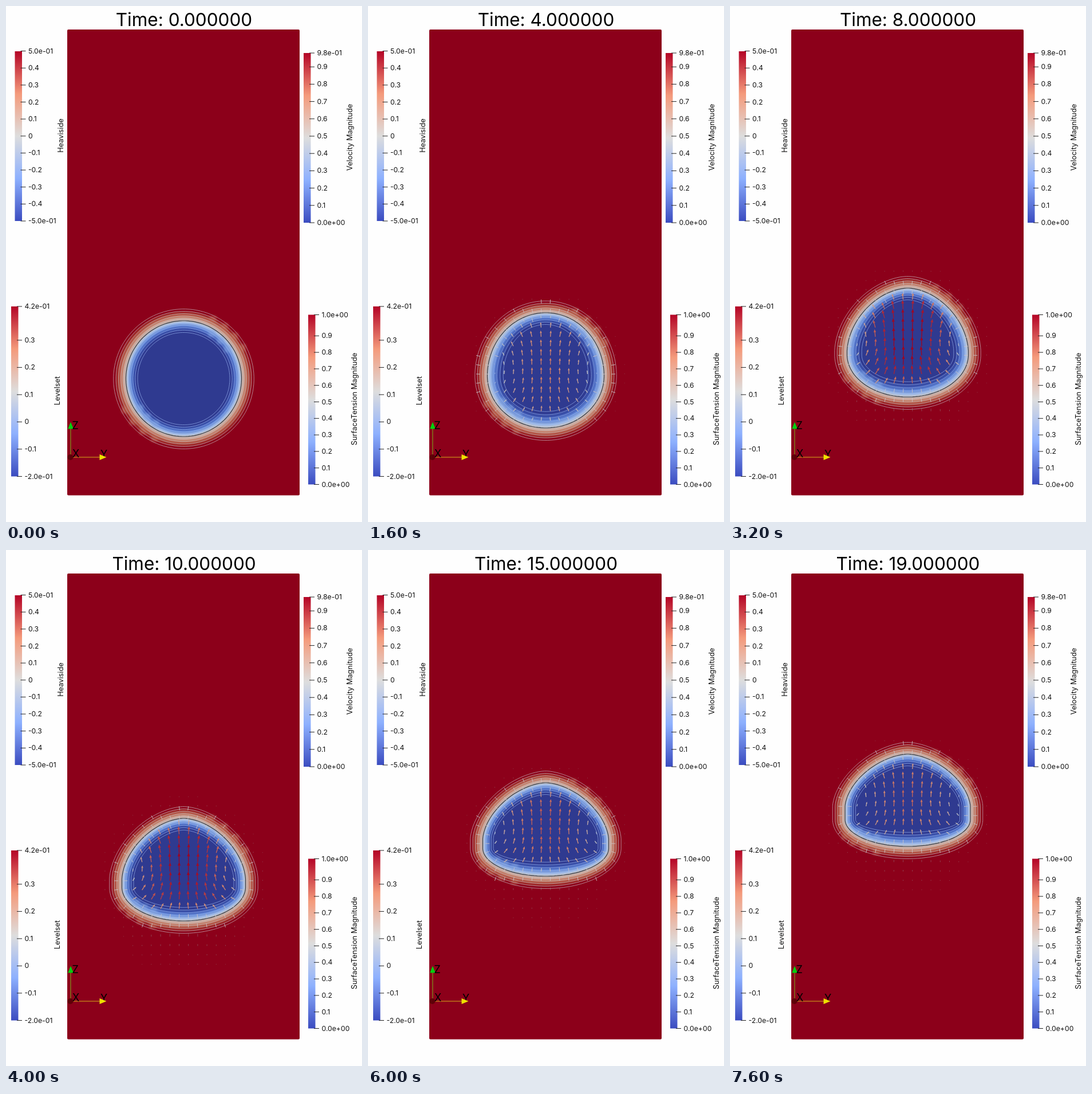
These frames come from a looping animation (622 px wide and 900 px high, 8000 ms). An HTML page:

```html
<!DOCTYPE html>
<html lang="en">
<head>
<meta charset="utf-8">
<title>Rising bubble</title>
<style>
  html, body { margin: 0; width: 100%; height: 100%; overflow: hidden; background: #fefefe; }
  svg { display: block; width: 622px; height: 900px; }
  text { font-family: Inter, "Open Sans", sans-serif; font-size: 12.2px; fill: #111; }
  .name { font-size: 12.8px; text-anchor: middle; }
  .axis { font-size: 18px; fill: #000; }
  #title { font-size: 31.5px; text-anchor: middle; fill: #000; }
</style>
</head>
<body>
<svg viewBox="0 0 622 900" xmlns="http://www.w3.org/2000/svg">
  <defs>
    <linearGradient id="bar" x1="0" y1="1" x2="0" y2="0"></linearGradient>
    <filter id="soft" x="-20%" y="-20%" width="140%" height="140%"><feGaussianBlur stdDeviation="2.2"/></filter>
  </defs>
  <rect width="622" height="900" fill="#fefefe"/>
  <rect x="107" y="41" width="406" height="812.5" rx="2" fill="#8c001a"/>
  <g id="scales"></g>
  <g id="bands"></g>
  <g id="spots" filter="url(#soft)"></g>
  <g id="rings" fill="none"></g>
  <g id="arrows"></g>
  <g id="axes">
    <path d="M113 787V736" stroke="#7d9a1c" stroke-width="1.2"/>
    <path d="M113 787H164" stroke="#d8b018" stroke-width="1.2"/>
    <circle cx="112.5" cy="787" r="5" fill="#5e0008"/>
    <path d="M113 725.5L118 737.5H108Z" fill="#00cf10"/>
    <text class="axis" x="115.5" y="738">Z</text>
    <text class="axis" x="116" y="787">X</text>
    <text class="axis" x="165" y="787.5">Y</text>
    <path d="M175.5 787L163.5 782V792Z" fill="#eee000"/>
  </g>
  <text id="title" x="311" y="34.5"></text>
</svg>
<script>
const STEP = 400, COUNT = 20, CX = 310.5;
const $ = id => document.getElementById(id);

// step, top, upper shoulder, lower shoulder, bottom, half width, inner side gap, inner bottom gap, speed, roundness of the dome
const KEYS = [
  [0, 549, 650, 650, 751, 101, 20, 20, 0, 2],
  [4, 535, 645, 645, 736, 102, 27, 28, .7, 2],
  [8, 492, 603, 608, 682, 106, 25, 26, 1, 1.8],
  [10, 468, 575, 588, 647, 108, 20, 23, .97, 1.74],
  [13, 430, 532, 548, 598, 110, 18, 23, .84, 1.7],
  [15, 406, 505, 520, 569, 110, 18, 24, .78, 1.7],
  [19, 356, 448, 470, 517, 109.5, 18, 24, .74, 1.7]
];
const WARM = [[0, 59, 76, 192], [.25, 141, 176, 254], [.5, 221, 221, 221], [.75, 244, 154, 123], [1, 180, 4, 38]];
const BAND = [
  [-18, 47, 58, 144], [-13, 60, 84, 174], [-8, 97, 134, 214], [-3, 161, 187, 228], [0, 194, 196, 204],
  [4, 204, 162, 145], [9, 189, 108, 87], [14, 162, 50, 45], [19, 140, 0, 26]
];

function ramp(stops, v, light = 1) {
  let i = 1;
  while (i < stops.length - 1 && stops[i][0] < v) i++;
  const a = stops[i - 1], b = stops[i];
  const f = Math.max(0, Math.min(1, (v - a[0]) / (b[0] - a[0])));
  return `rgb(${[1, 2, 3].map(k => Math.round(light * (a[k] + (b[k] - a[k]) * f)))})`;
}

// Cubic interpolation through the keys
function keyed(step, col) {
  const last = KEYS.length - 1;
  let i = 0;
  while (i < last - 1 && KEYS[i + 1][0] <= step) i++;
  const slope = j => {
    const a = KEYS[Math.max(0, j - 1)], b = KEYS[Math.min(last, j + 1)];
    return j === 0 && col !== 8 ? 0 : (b[col] - a[col]) / (b[0] - a[0]);
  };
  const a = KEYS[i], b = KEYS[i + 1], h = b[0] - a[0], u = (step - a[0]) / h;
  const u2 = u * u, u3 = u2 * u;
  return (2 * u3 - 3 * u2 + 1) * a[col] + (u3 - 2 * u2 + u) * h * slope(i)
    + (3 * u2 - 2 * u3) * b[col] + (u3 - u2) * h * slope(i + 1);
}

function bubble(step) {
  const [top, upper, lower, bottom, width, side, base, speed, dome] = [1, 2, 3, 4, 5, 6, 7, 8, 9].map(c => keyed(step, c));
  return { top, upper, lower, bottom, width, side, base, speed, dome };
}

// Point of the level line at distance d from the interface
function pointAt(b, d, deg) {
  const a = deg * Math.PI / 180, c = Math.cos(a), s = Math.sin(a);
  const p = s > 0 ? b.dome : 2;
  const w = b.width + d * (d < 0 ? b.side / 20 : 1.06);
  const up = b.upper - b.top + d;
  const down = b.bottom - b.lower + d * (d < 0 ? b.base / 20 : 1.05);
  const x = CX + Math.sign(c) * w * Math.abs(c) ** (2 / p);
  const rise = Math.abs(s) ** (2 / p);
  return [x, s > 0 ? b.upper - up * rise : b.lower + down * rise];
}

function outline(b, d) {
  const pts = [];
  for (let deg = 1.5; deg < 360; deg += 3) pts.push(pointAt(b, d, deg).map(v => v.toFixed(1)).join(" "));
  return `M${pts.join("L")}Z`;
}

// Signed distance and outward normal
function probe(b, x, y) {
  const above = y < b.upper, p = above ? b.dome : 2;
  const dy = above ? y - b.upper : Math.max(0, y - b.lower);
  const w = b.width, h = above ? b.upper - b.top : b.bottom - b.lower;
  const u = (x - CX) / w, v = dy / h;
  const r = (Math.abs(u) ** p + Math.abs(v) ** p) ** (1 / p) || 1e-6;
  const gx = Math.sign(u) * (Math.abs(u) / r) ** (p - 1) / w;
  const gy = Math.sign(v) * (Math.abs(v) / r) ** (p - 1) / h;
  const g = Math.hypot(gx, gy) || 1 / w;
  return { d: (r - 1) / g, nx: gx / g, ny: gy / g };
}

function drawBands(b) {
  let s = "";
  for (let d = 19; d >= -18; d--) s += `<path d="${outline(b, d)}" fill="${ramp(BAND, d)}"/>`;
  $("bands").innerHTML = s;
}

// Uneven patches where the mesh cells run along the interface
function drawSpots(b) {
  let s = "";
  const spot = (deg, d, color) => {
    const [x, y] = pointAt(b, d, deg);
    s += `<rect x="${(x - 6).toFixed(1)}" y="${(y - 6).toFixed(1)}" width="12" height="12" fill="${color}" opacity=".6"/>`;
  };
  for (const base of [28, 208]) {
    for (let i = 0; i < 4; i++) {
      spot(base + i * 12, 14, "#bd664f");
      if (i < 3) spot(base + 6 + i * 12, -8, "#7f9fdc");
    }
  }
  $("spots").innerHTML = s;
}

function drawRings(b) {
  let s = "";
  for (let k = -5; k <= 5; k++) {
    if (!k) continue;
    const look = k < 0 ? 'stroke="#a3c0fa" stroke-opacity=".65"' : 'stroke="#cfcbd0" stroke-opacity=".7"';
    s += `<path d="${outline(b, k * 4.1)}" ${look} stroke-width=".9"/>`;
  }
  $("rings").innerHTML = s + `<path d="${outline(b, 0)}" stroke="#35373d" stroke-width="1.2"/>`;
}

function tick(x, y, vx, vy, color, width = 1) {
  return `<path d="M${x.toFixed(1)} ${y.toFixed(1)}l${vx.toFixed(1)} ${vy.toFixed(1)}" stroke="${color}" stroke-width="${width}"/>`;
}

function arrow(x, y, vx, vy, color) {
  const len = Math.hypot(vx, vy), ux = vx / len, uy = vy / len;
  const half = Math.min(2.5, len * .16), neck = .6;
  const mx = x + vx * neck, my = y + vy * neck;
  const pts = [[x + vx, y + vy], [mx - uy * half, my + ux * half], [mx + uy * half, my - ux * half]];
  return tick(x, y, vx * neck, vy * neck, color, 1.3)
    + `<path d="M${pts.map(p => p.map(v => v.toFixed(1)).join(" ")).join("L")}Z" fill="${color}"/>`;
}

function drawArrows(b) {
  const mid = (b.top + b.bottom) / 2, tall = (b.bottom - b.top) / 2, v = b.speed;
  let s = "";
  for (let i = -11; i <= 12; i++) for (let j = 8; j < 38; j++) {
    const x = 302.5 + i * 16.2, y = 853 - j * 16.24;
    const { d, nx, ny } = probe(b, x, y);
    const px = (x - CX) / b.width, py = (y - mid) / tall;
    if (d < -8) {
      const near = Math.min(1, .5 - d / 60);
      const vx = -v * 1.4 * px * py * near;
      const vy = -v * Math.max(.1, 1 - .85 * px * px) * (1 - .3 * py * py) * near;
      const m = Math.hypot(vx, vy);
      if (m > .04) s += arrow(x, y, vx * 17.5, vy * 17.5, ramp(WARM, .15 + m * .9, .88));
    } else if (d < 24) {
      const len = 7 * Math.min(1, v * 1.5);
      if (len > .5) s += tick(x, y, -nx * len, -ny * len, "#cbc3c6", .9);
    } else {
      const wake = y > b.lower && Math.abs(px) < 1;
      const len = v * (wake ? 6 * (1 - px * px * .7) * Math.exp((24 - d) / 36) : 2 * Math.exp((24 - d) / 20));
      if (len > .7) s += `<g opacity=".45">${tick(x, y, 0, -len, "#9a8f96")}</g>`;
    }
  }
  $("arrows").innerHTML = s;
}

function scale(x, top, bottom, labels, name, nameX, nameY) {
  let s = `<rect x="${x}" y="${top}" width="12.5" height="${bottom - top}" fill="url(#bar)"/>`;
  for (const [label, y] of labels) {
    s += `<path d="M${x + 10} ${y}h9" stroke="#222"/><text x="${x + 23.5}" y="${y + 4}">${label}</text>`;
  }
  $("scales").innerHTML += s + `<text class="name" transform="translate(${nameX} ${nameY}) rotate(-90)">${name}</text>`;
}

// Evenly spaced labels, with the two ends written in full
function labels(from, to, zero, unit, first, firstY, last, lastY) {
  const list = [[first, firstY]];
  for (let k = from; k >= to; k--) list.push([k ? (k / 10).toFixed(1) : "0", zero - k * unit]);
  return [...list, [last, lastY]];
}

function setup() {
  $("bar").innerHTML = WARM.map(c => `<stop offset="${c[0]}" stop-color="${ramp(WARM, c[0])}"/>`).join("");
  scale(15.5, 79, 375, labels(4, -4, 226.8, 29.65, "5.0e-01", 78.5, "-5.0e-01", 375), "Heaviside", 100, 226);
  scale(9, 524, 820.5, labels(3, -1, 725.4, 47.5, "4.2e-01", 524, "-2.0e-01", 820.5), "Levelset", 94, 671);
  scale(520, 82, 378, labels(9, 1, 378, 30.2, "9.8e-01", 82, "0.0e+00", 378), "Velocity Magnitude", 605, 229);
  scale(528, 538.5, 834.5, labels(9, 1, 834.5, 28.8, "1.0e+00", 538.5, "0.0e+00", 834.5), "SurfaceTension Magnitude", 613, 685.5);
}

let shown = -1;
function draw(ms) {
  const step = Math.floor(ms / STEP) % COUNT;
  if (step === shown) return;
  shown = step;
  const b = bubble(step);
  drawBands(b);
  drawSpots(b);
  drawRings(b);
  drawArrows(b);
  $("title").textContent = `Time: ${step.toFixed(6)}`;
}

setup();
const start = performance.now();
draw(0);
requestAnimationFrame(function loop() {
  draw(performance.now() - start);
  requestAnimationFrame(loop);
});
</script>
</body>
</html>
```
